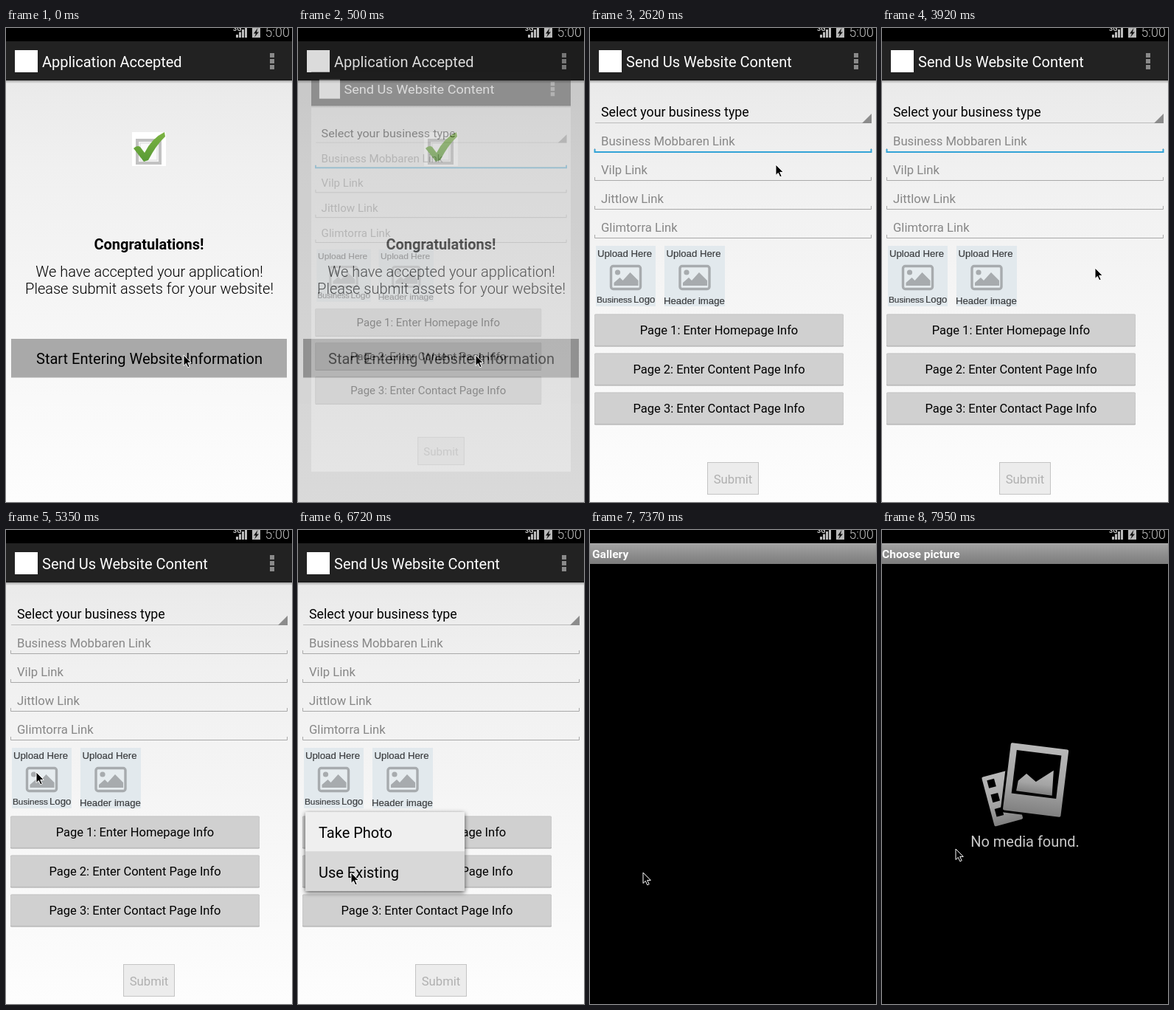
These frames come from a looping animation (388 by 642 pixels, 8 s). An HTML page:

```html
<!DOCTYPE html>
<html lang="en">
<head>
<meta charset="utf-8">
<title>Website content form</title>
<style>
html, body { margin: 0; width: 100%; height: 100%; overflow: hidden; background: #000; }
svg { display: block; width: 100%; height: 100%; }
text { font-family: Roboto, sans-serif; white-space: pre; }
.arial { font-family: "Liberation Sans", Arial, sans-serif; fill: #3c3e40; stroke: #3c3e40; stroke-width: .2; }
</style>
</head>
<body>
<svg id="stage" viewBox="0 0 388 642" xmlns="http://www.w3.org/2000/svg"></svg>
<script>
const LOOP = 8000;
const stage = document.getElementById('stage');

const rect = (x, y, w, h, fill, more = '') =>
  `<rect x="${x}" y="${y}" width="${w}" height="${h}" fill="${fill}" ${more}/>`;
const path = (d, fill, more = '') => `<path d="${d}" fill="${fill}" ${more}/>`;
const text = (x, y, size, str, more = '') =>
  `<text x="${x}" y="${y}" font-size="${size}" ${more}>${str}</text>`;
const mid = 'text-anchor="middle"';

const defs = `<defs>
  <linearGradient id="paper" x2="0" y2="1"><stop stop-color="#eaeaea"/><stop offset=".2" stop-color="#f0f0f0"/><stop offset="1" stop-color="#fdfdfd"/></linearGradient>
  <linearGradient id="bar" x2="0" y2="1"><stop stop-color="#a4a4a4"/><stop offset=".5" stop-color="#8f8f8f"/><stop offset="1" stop-color="#7c7c7c"/></linearGradient>
  <linearGradient id="steel" x2="0" y2="1"><stop stop-color="#b8b8b8"/><stop offset=".6" stop-color="#a4a4a4"/><stop offset="1" stop-color="#808080"/></linearGradient>
  <linearGradient id="fall" x2="0" y2="1"><stop stop-color="#000" stop-opacity=".3"/><stop offset="1" stop-color="#000" stop-opacity="0"/></linearGradient>
  <linearGradient id="leaf" x2="0" y2="1"><stop stop-color="#7cb342"/><stop offset="1" stop-color="#589a35"/></linearGradient>
  <filter id="lift" x="-10%" y="-10%" width="120%" height="125%"><feDropShadow dx="0" dy="2" stdDeviation="3" flood-opacity=".65"/></filter>
</defs>`;

// Light page with the dark title bar
const page = (title, body) =>
  rect(0, 71, 388, 571, 'url(#paper)') + rect(0, 18, 388, 53, '#222') +
  rect(0, 70, 388, 1, '#161616') + rect(0, 71, 388, 4, 'url(#fall)') +
  rect(12, 30, 31, 30, '#fff') + text(49, 52.5, 20, title, 'fill="#fff"') +
  [34, 42, 50].map(y => rect(358, y, 6, 6, '#8a8a8a')).join('') + body;

const accepted = page('Application Accepted',
  rect(171, 141, 46, 46, '#fff') +
  rect(178, 152, 31, 31, '#f4f4f4', 'stroke="#c2c2c2" stroke-width="4"') +
  rect(182, 156, 23, 23, '#fafafa', 'stroke="#dedede"') +
  path('M173 163 Q178 158 182 161 L188 169 Q198 149 215 141 L216 147 Q204 158 193 179 L187 181 Z', 'url(#leaf)') +
  text(194, 299.5, 20, 'Congratulations!', mid + ' font-weight="700"') +
  text(194.5, 337, 20, 'We have accepted your application!', mid + ' font-weight="300"') +
  text(194.5, 360, 20, 'Please submit assets for your website!', mid + ' font-weight="300"') +
  rect(7, 421, 374, 52.5, '#a9a9a9') +
  text(194.5, 455, 20, 'Start Entering Website Information', mid));

const field = (label, y) =>
  text(15, y - 8, 16.67, label, 'fill="#878787"') +
  path(`M6.5 ${y - 4}V${y + .5}H381.5V${y - 4}`, 'none', 'stroke="#a9a9a9"');

const upload = (x, w, caption) =>
  rect(x, 295, w, 82, '#e2e9ed') +
  `<g transform="translate(${x + w / 2 - 49})">` +
  rect(29, 322.5, 40, 31, '#e6ecef', 'rx="3" stroke="#a7abae" stroke-width="3.4"') +
  `<circle cx="38" cy="331" r="3.6" fill="#a7abae"/>` +
  path('M33 349V345L41 338L45 342L55 331L66 342V349Z', '#a7abae') + '</g>' + caption;

const wide = (label, y) =>
  rect(6, y + 1, 338, 43.5, '#9b9b9b', 'rx="1.5"') +
  rect(6, y + .5, 338, 43, '#d0d0d0', 'rx="1.5"') +
  rect(6.5, y + 1, 337, 42, 'none', 'rx="1" stroke="#c8c8c8"') +
  text(175, y + 28, 16.5, label, mid);

const form = page('Send Us Website Content',
  text(15, 120, 17.78, 'Select your business type') +
  rect(7, 128, 375, 1, '#bcbcbc') + path('M382 116V129H369Z', '#8c8c8c') +
  field('Business Mobbaren Link', 167) + field('Vilp Link', 206) +
  field('Jittlow Link', 245) + field('Glimtorra Link', 284) +
  path('M6.5 164V168H381.5V164', 'none', 'id="focus" stroke="#33a3d6" stroke-width="2"') +
  upload(8, 81, text(10, 310, 13.2, 'Upload Here', 'class="arial"') +
    text(9, 372, 11.8, 'Business', 'class="arial"') + text(59, 372, 13.2, 'Logo', 'class="arial"')) +
  upload(101, 82, text(103.5, 310, 13.2, 'Upload Here', 'class="arial"') +
    text(100, 373.5, 13.2, 'Header image', 'class="arial"')) +
  wide('Page 1: Enter Homepage Info', 387) +
  wide('Page 2: Enter Content Page Info', 440) +
  wide('Page 3: Enter Contact Page Info', 493) +
  rect(159.5, 588.5, 69, 43, '#ececec', 'stroke="#c4c4c4"') +
  text(194, 616.5, 16.67, 'Submit', mid + ' fill="#b0b0b0"'));

const popup =
  rect(10, 382, 216, 107, '#efefef', 'rx="1" filter="url(#lift)"') +
  rect(10, 435, 216, 1, '#dcdcdc') +
  rect(10, 436, 216, 53, '#d8d8d8', 'id="pressed"') +
  text(28, 417, 20, 'Take Photo') + text(28, 471, 20, 'Use Existing');

const gallery =
  rect(0, 18, 388, 624, '#000') + rect(0, 18, 388, 28, 'url(#bar)') +
  rect(0, 18, 388, 1, '#b4b4b4') +
  text(0, 38, 15.55, '', 'id="heading" font-weight="700" fill="#fff"') +
  '<g id="empty"><g transform="translate(135 335) rotate(-15)">' +
  rect(0, 0, 40, 69, 'url(#steel)', 'rx="2"') +
  [6, 26, 46].map(y => rect(6, y, 10, 11, '#000')).join('') +
  '</g><g transform="translate(175 288) rotate(7)">' +
  rect(0, 0, 79, 92, 'url(#steel)', 'rx="2" stroke="#000" stroke-width="6" paint-order="stroke"') +
  rect(9, 9, 61, 59, '#000') +
  path('M15 64L16 50L26 39L40 48.5L62 30.5L64 64.5Z', 'url(#steel)') + '</g>' +
  text(194, 429, 20, 'No media found.', mid + ' fill="#c8c8c8"') + '</g>';

const status =
  rect(0, 0, 388, 18, '#000') +
  text(308, 4, 9, '3G', 'fill="#c4c4c4" font-weight="700"') +
  [0, 1, 2, 3].map(i => rect(312 + i * 4, 9 - i * 3.5, 3, 4 + i * 3.5, '#bdbdbd')).join('') +
  rect(334, 0, 11, 13, '#b9b9b9') + path('M341.5 0L336 7.5H339L337 12.5L343 5.5H340Z', '#111') +
  text(351.5, 12, 17.78, '5:00', 'fill="#c0c0c0" font-weight="300"');

stage.innerHTML = defs + rect(0, 0, 388, 642, '#000') +
  `<g id="accepted">${accepted}</g>` +
  `<g id="form">${form}<g id="popup">${popup}</g></g>` +
  rect(0, 18, 388, 624, '#000', 'id="dim"') +
  `<g id="gallery">${gallery}</g>${status}` +
  path('M0 0V14.5L3.3 11.4L5.8 16.8L8.2 15.7L5.7 10.4H10.3Z', '#000', 'id="cursor" stroke="#fff" stroke-width="1"');

const el = {};
for (const node of stage.querySelectorAll('g[id], rect[id], path[id], text[id]')) el[node.id] = node;

// Pointer moves: start, end, number of steps, way points
const moves = [
  [1850, 2320, 9, [[241, 443], [275, 380], [297, 320], [280, 250], [251, 186]]],
  [2500, 2800, 6, [[251, 186], [254, 179], [252, 185], [248, 225], [238, 269]]],
  [2970, 3510, 10, [[238, 269], [250, 330], [262, 364], [280, 325], [291, 283]]],
  [3810, 4040, 5, [[291, 283], [288, 335], [280, 388]]],
  [4220, 4520, 6, [[280, 388], [160, 360], [41, 328]]],
  [5940, 6480, 10, [[41, 328], [60, 400], [72, 464]]],
  [7950, 7950, 1, [[72, 464], [100, 432]]]
];

const along = (pts, u) => {
  const s = u * (pts.length - 1), i = Math.min(Math.floor(s), pts.length - 2);
  return [0, 1].map(k => pts[i][k] + (pts[i + 1][k] - pts[i][k]) * (s - i));
};

// Fraction done after discrete steps, the first one at t0
const stepped = (t, t0, gap, n) =>
  t < t0 ? 0 : Math.min(n, Math.floor((t - t0) / gap + 1e-6) + 1) / n;

function pointer(t) {
  let at = moves[0][3][0];
  for (const [t0, t1, n, pts] of moves)
    if (t >= t0) at = along(pts, stepped(t, t0, (t1 - t0) / (n - 1) || 1, n));
  return at;
}

const show = (node, a) => {
  node.style.display = a > 0 ? '' : 'none';
  node.setAttribute('opacity', a);
};

const zoom = (node, cx, cy, sx, sy) => node.setAttribute('transform',
  `translate(${cx} ${cy}) scale(${sx} ${sy}) translate(${-cx} ${-cy})`);

// A new screen grows and fades in over the old one
function open(node, u) {
  const left = (1 - u) ** 2;
  show(node, Math.min(1, u * 1.4));
  zoom(node, 194, 330, 1 - .165 * left, 1 - .235 * left);
}

function render(t) {
  const toForm = stepped(t, 500, 90, 4);
  const toGallery = stepped(t, 7130, 60, 4);
  const menu = stepped(t, 5410, 60, 3);

  open(el.form, toForm);
  open(el.gallery, toGallery);
  show(el.dim, Math.min(.28, toGallery * .56));
  show(el.accepted, toForm < 1 ? 1 - .28 * Math.min(1, toForm * 2) : 0);
  show(el.focus, t < 5350 ? 1 : 0);

  show(el.popup, t < 7070 ? menu : t < 7130 ? .4 : 0);
  zoom(el.popup, 10, 382, .85 + .15 * menu, .85 + .15 * menu);
  show(el.pressed, t >= 6720 ? 1 : 0);

  const ready = t >= 7660;
  el.heading.textContent = ready ? 'Choose picture' : 'Gallery';
  el.heading.setAttribute('x', ready ? 0 : 3);
  show(el.empty, stepped(t, 7660, 55, 3));

  const [x, y] = pointer(t);
  el.cursor.setAttribute('transform', `translate(${Math.round(x)} ${Math.round(y)})`);
}

function tick() {
  render(performance.now() % LOOP);
  requestAnimationFrame(tick);
}
tick();
</script>
</body>
</html>
```
